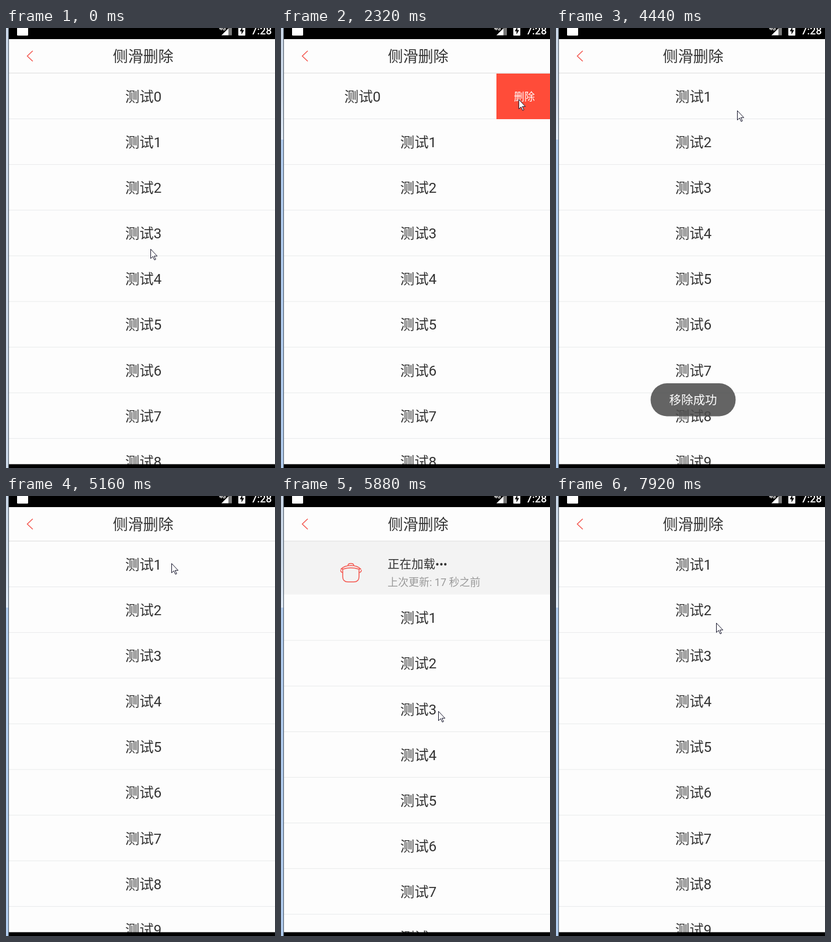
Animation, 462 px wide and 753 px high, one loop 8 s. Source, as an HTML page:

```html
<!DOCTYPE html>
<html lang="zh">
<head>
<meta charset="utf-8">
<style>
  html, body { margin: 0; width: 100%; height: 100%; overflow: hidden; background: #fdfdfd; }
  svg { display: block; width: 462px; height: 753px; }
  text { font-family: Roboto, "Noto Sans CJK SC", "Noto Sans CJK", sans-serif; fill: #333; }
  .mid { text-anchor: middle; }
  .row { font-size: 24.4px; }
  .white { fill: #fff; }
  .red { fill: none; stroke: #f4564e; stroke-width: 1.5; stroke-linecap: round; stroke-linejoin: round; }
</style>
</head>
<body>
<svg viewBox="0 0 462 753">
  <defs>
    <linearGradient id="glow" x2="0" y2="1">
      <stop stop-color="#c9d6e6"/>
      <stop offset=".6" stop-color="#cddaea"/>
      <stop offset="1" stop-color="#dfeaf7"/>
    </linearGradient>
  </defs>
  <rect width="462" height="753" fill="#fdfdfd"/>

  <g id="loader">
    <rect x="5" y="50" width="457" height="118.5" fill="#f3f3f3"/>
    <g class="red">
      <path d="M115 119q0-3.500 5-3.500t5 3.500"/>
      <path d="M103 125c3-3 9-6 17-6s14 3 17 6h-4c-4-1.500-8-2-13-2s-9 .5-13 2z"/>
      <path d="M106 126v12q0 9 9 9h10q9 0 9-9v-12M106 131q-3.500-.5-3.500-4M134 131q4-.5 4-4"/>
    </g>
    <text x="183" y="124" font-size="20.5">正在加载•••</text>
    <text x="183" y="154" font-size="18" style="fill:#999">上次更新: 17 秒之前</text>
  </g>

  <g id="list"></g>
  <g id="first">
    <rect x="466" y="78" width="96" height="78" fill="#ff4c39"/>
    <text class="mid white" x="514" y="123.500" font-size="18">删除</text>
  </g>

  <rect x="5" y="19" width="457" height="58" fill="#fdfdfd"/>
  <rect x="5" y="76.500" width="457" height="1.300" fill="#e4e4e4"/>
  <path class="red" d="M45.500 39.500L36.500 48l9 8.500"/>
  <text class="mid" x="235.500" y="58" font-size="26">侧滑删除</text>

  <rect x="5" width="457" height="19"/>
  <rect x="19" y="-6" width="19" height="19" rx="1.500" fill="#fff"/>
  <text class="white" x="366" y="3.500" font-size="9" font-weight="700">4G</text>
  <path fill="#fff" d="M370 12.500L382 .5v12z"/>
  <path fill="#777" d="M382 .5L388 -5.500v18h-6z"/>
  <rect x="399" y="-6" width="12" height="19" rx="1" fill="#fff"/>
  <path d="M406-2l-4.500 7.500h3V11l4.500-7.500h-3z"/>
  <text class="white" x="421" y="11" font-size="18" font-weight="500">7:28</text>

  <rect x="5" y="746.500" width="457" height="7"/>
  <rect width="4" height="753" fill="#c9d6e6"/>
  <g id="focus">
    <rect width="4" height="191" fill="url(#glow)"/>
    <rect y="191" width="4" height="562" fill="#b0cbed"/>
  </g>
  <rect x="4" width="1" height="753" fill="#46525f"/>

  <g id="toast">
    <rect x="162.500" y="608" width="146" height="56.500" rx="28" fill="#4d4d4d" fill-opacity=".87"/>
    <text class="mid white" x="235.500" y="644" font-size="20.5">移除成功</text>
  </g>
  <path id="cursor" fill="#fff" stroke="#14142a" d="M.5.5v16l3.700-3.500 2.800 6 2.200-1-2.800-5.700h5.200z"/>
</svg>
<script>
const $ = id => document.getElementById(id);
const LOOP = 8000, STEP = 137, PITCH = 78.13, LOADER = 91.55;

const row = i => `
  <rect x="5" y="${155 + PITCH * i}" width="462" height="1" fill="#e8eaeb"/>
  <text class="mid row" x="236" y="${125.75 + PITCH * i}">测试${i}</text>`;
$('first').insertAdjacentHTML('afterbegin', row(0));
$('list').innerHTML = Array.from({ length: 10 }, (_, i) => row(i + 1)).join('');

const clamp = v => Math.max(0, Math.min(1, v));
const smooth = v => (v = clamp(v), v * v * (3 - 2 * v));

// Progress from 0 to 1 in even jumps: the first at start, the last at end
function progress(t, start, end) {
  const gaps = Math.round((end - start) / STEP);
  return t < start ? 0 : clamp((Math.floor((t - start + 6) / (end - start) * gaps) + 1) / (gaps + 1));
}

// Each move heads for a point from wherever the last one stopped
const moves = [
  { start: 120, end: 1080, x: 318, y: 134 },
  { start: 1230, end: 1620, x: 136, y: 133 },
  { start: 1890, end: 2320, x: 408, y: 122 },
  { start: 3660, end: 4590, x: 293, y: 138, bow: 12 },
  { start: 4740, end: 5160, x: 284, y: 115, bow: -35 },
  { start: 5310, end: 5730, x: 270, y: 368 },
  { start: 7380, end: 7920, x: 275, y: 217 }
];

function pointer(t) {
  let x = 248, y = 378;
  for (const m of moves) {
    const p = smooth(progress(t, m.start, m.end));
    x += (m.x - x) * p;
    y += (m.y - y) * p + (m.bow || 0) * Math.sin(Math.PI * p);
  }
  return [Math.round(x), Math.round(y)];
}

const shift = (id, x, y) => $(id).setAttribute('transform', `translate(${x} ${y})`);
const alpha = (id, v) => $(id).setAttribute('opacity', v);

function draw(t) {
  const swipe = progress(t, 1230, 1620);
  const remove = progress(t, 2750, 3260);
  const drag = smooth(progress(t, 5310, 5730));
  const release = progress(t, 5880, 6390);
  const pull = release ? LOADER * (1 - smooth((release - .2) / .8)) : 98 * drag;

  shift('cursor', ...pointer(t));
  shift('first', -96 * clamp(2 * swipe), 0);
  shift('list', 0, pull - PITCH * smooth(2 * remove - .6));
  shift('loader', 0, pull - LOADER);
  alpha('first', clamp(1 - 2.5 * remove));
  alpha('loader', pull > 0 ? 1 : 0);
  alpha('toast', smooth(remove) * (1 - progress(t, 4740, 5160)));
  alpha('focus', t < 1080 ? 0 : 1);
}

const begin = performance.now();
function tick() {
  draw((performance.now() - begin) % LOOP);
  requestAnimationFrame(tick);
}
tick();
</script>
</body>
</html>
```
